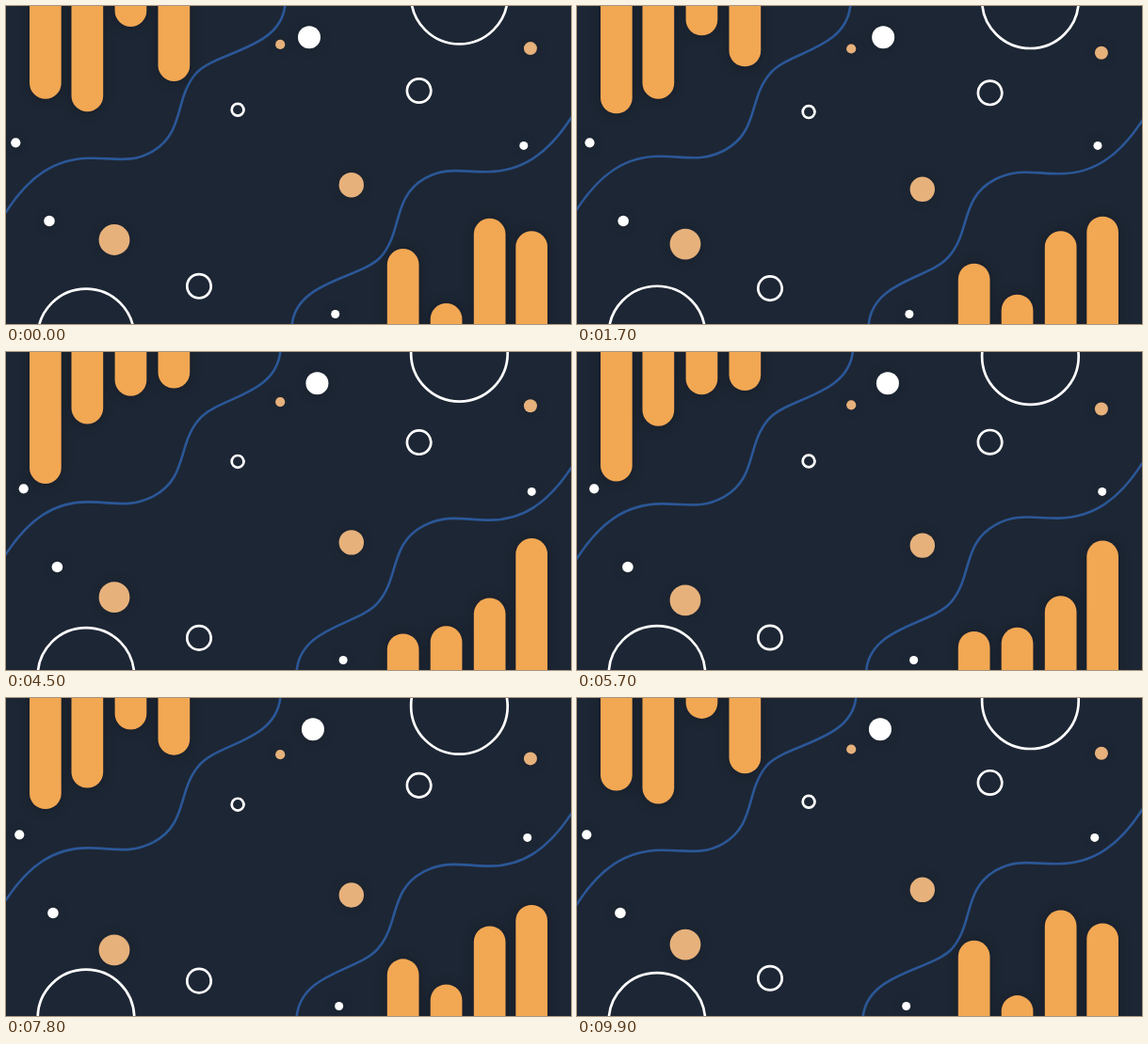
These frames come from a looping animation (600 by 338 pixels, 10000 ms). An HTML page with a canvas:

```html
<!DOCTYPE html>
<html lang="en">
<head>
<meta charset="utf-8">
<title>Drifting bars and circles</title>
<style>
  html, body { margin: 0; width: 100%; height: 100%; overflow: hidden; background: #1d2634; }
  canvas { display: block; }
</style>
</head>
<body>
<canvas id="stage" width="600" height="338"></canvas>
<script>
const ctx = document.getElementById('stage').getContext('2d');
const W = 600, H = 338, TAU = Math.PI * 2;
const LOOP = 10, STEP = 0.1, WAVE_PERIOD = 3.3;
const BACK = '#1d2634', BAR = '#f2a753', DOT = '#e6b17b', WAVE = '#2b5797', WHITE = '#fff';

// Bézier knots and handles of the wave at rest
const wavePath = [
  [0, 217.3], [25, 179], [52, 161], [88, 160.7],
  [115, 160.4], [132, 167], [156, 154],
  [192, 134], [180, 98], [204, 71],
  [225, 48], [288, 46], [293.2, 0]
];

function shadow(alpha) {
  ctx.shadowColor = `rgba(0, 0, 0, ${alpha})`;
  ctx.shadowBlur = alpha ? 13 : 0;
}

function disc(x, y, r, color) {
  ctx.fillStyle = color;
  ctx.beginPath();
  ctx.arc(x, y, r, 0, TAU);
  ctx.fill();
}

function ring(x, y, r) {
  ctx.strokeStyle = WHITE;
  ctx.lineWidth = 2.7;
  ctx.beginPath();
  ctx.arc(x, y, r, 0, TAU);
  ctx.stroke();
}

// A ripple along the wave: the low end sways up and down, the rest sideways
function sway([x, y], t) {
  const u = x / 293.2;
  const swing = Math.cos(TAU * (t / WAVE_PERIOD + 0.15 * (1 - u)));
  return [
    x + 3 * u * Math.cos(3 * Math.PI * (1 - u)) * swing,
    y + 2.8 * (1 - u) ** 2 * swing
  ];
}

function drawWave(t) {
  const pts = wavePath.map(p => sway(p, t));
  ctx.strokeStyle = WAVE;
  ctx.lineWidth = 2.6;
  ctx.lineCap = 'square';
  ctx.beginPath();
  ctx.moveTo(...pts[0]);
  for (let i = 1; i < pts.length; i += 3) {
    ctx.bezierCurveTo(...pts[i], ...pts[i + 1], ...pts[i + 2]);
  }
  ctx.stroke();
}

function bar(x, length) {
  ctx.fillStyle = BAR;
  ctx.beginPath();
  ctx.roundRect(x, -60, 33.7, 60 + length, 16.85);
  ctx.fill();
}

function drawCorner(t, shift) {
  drawWave(t);
  shadow(0.26);
  bar(25, 98.8 + 9.15 * shift);
  bar(69.5, 112.3 - 7.95 * shift);
  bar(115.6, 22 + 5.5 * shift);
  bar(161.5, 80 - 9.2 * shift);
  shadow(0);
}

// Constant speed out to the peak time, then back to zero at the end time
const bounce = (t, peak, end) => t < peak ? t : peak * (end - t) / (end - peak);

function draw(t) {
  const near = bounce(t, 4.97, 9.88), far = bounce(t, 7.46, 14.92);
  const right = 1.87 * near, down = 1.35 * near, fall = 2.71 * far;

  ctx.fillStyle = BACK;
  ctx.fillRect(0, 0, W, H);

  // The lower right corner is the upper left one turned half round
  drawCorner(t, near);
  ctx.save();
  ctx.translate(W, H);
  ctx.rotate(Math.PI);
  drawCorner(t, near);
  ctx.restore();

  ring(481.4, fall - 10.9, 51.3);
  ring(85, 351.9 - 1.67 * far, 51.3);
  ring(438.6, 90 + down, 12.7);
  ring(205, 297.8 + down, 12.7);
  ring(246.1, 110.3 + down, 6.4);

  shadow(0.15);
  disc(322 + right, 33.2, 12, WHITE);
  disc(10.3 + right, 145.3, 5.1, WHITE);
  disc(46 + right, 228.5, 5.8, WHITE);
  disc(549.8 + right, 148.4, 4.5, WHITE);
  disc(349.7 + right, 327.5, 4.5, WHITE);
  disc(115, 248.5 + fall, 16.4, DOT);
  disc(366.8, 190.2 + fall, 13.2, DOT);
  disc(556.9, 45.1 + fall, 7, DOT);
  disc(291.2, 40.9 + fall, 5.1, DOT);
  shadow(0);
}

const start = performance.now();
function tick() {
  const elapsed = (performance.now() - start) / 1000;
  draw(Math.floor((elapsed % LOOP) / STEP) * STEP);
  requestAnimationFrame(tick);
}
tick();
</script>
</body>
</html>
```
